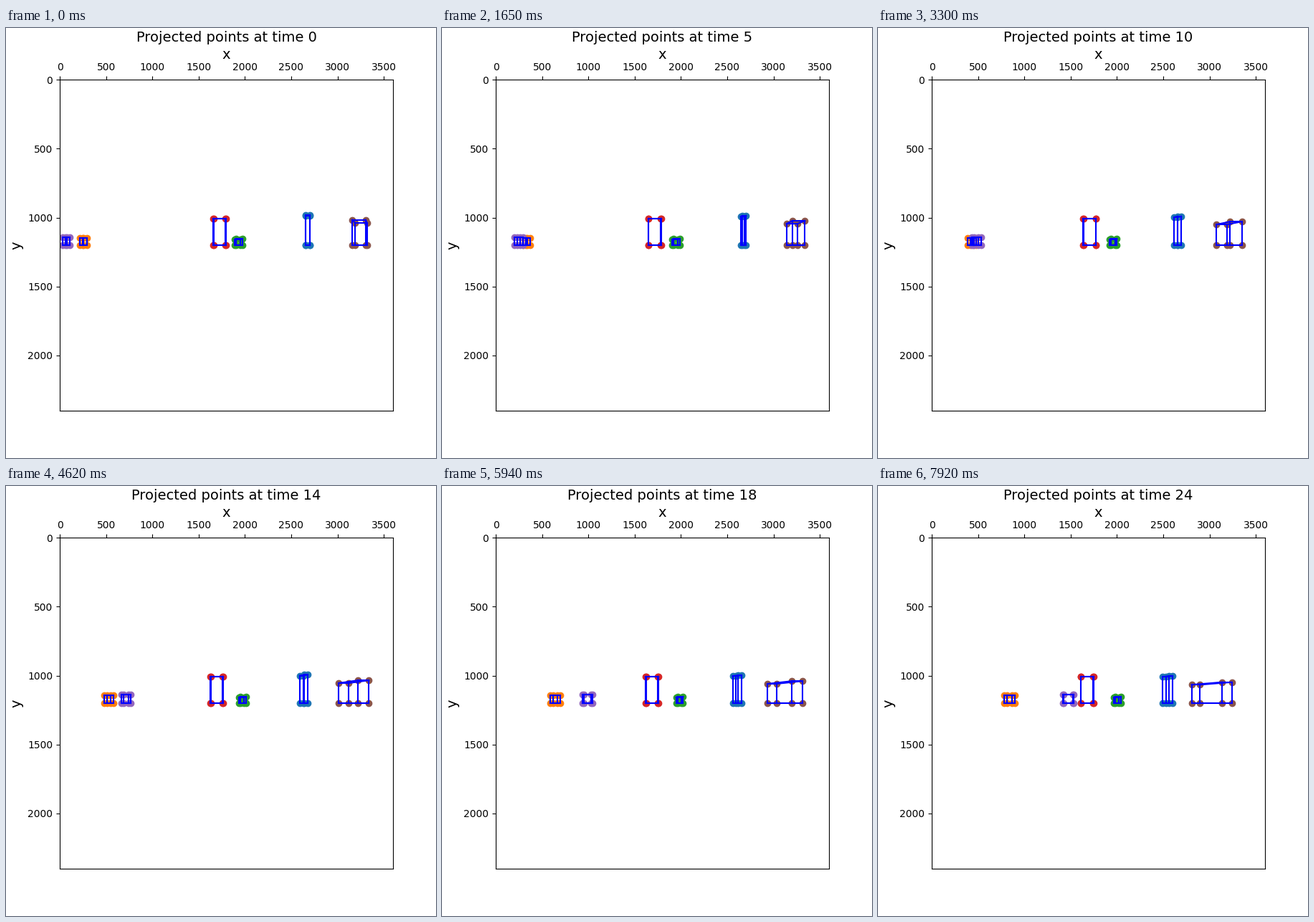
A matplotlib script for the animation above (8 s loop, 600 px wide and 600 px high).

```python
import numpy as np
import matplotlib.pyplot as plt
from matplotlib.animation import FuncAnimation

LOOP, TICK, STEP = 8000, 40, 330      # ms
GROUND = 1200                         # y of every footprint

# footprint corners in ring order: side (left/right) and row (near/far)
SIDE = np.array([-1, 1, 1, -1])
ROW = np.array([1, 1, -1, -1])

fig = plt.figure(figsize=(6, 6), dpi=100)
ax = fig.add_axes([0.125, 0.11, 0.775, 0.77])
ax.set_xlim(0, 3600)
ax.set_ylim(2400, 0)
ax.xaxis.tick_top()
ax.xaxis.set_label_position("top")
ax.set_xlabel("x", fontsize=14)
ax.set_ylabel("y", fontsize=14)
title = ax.set_title("Projected points at time 0", fontsize=14)


def at(t, start, speed=0, accel=0):
    return start + speed * t + accel * t * t


def to_x(px):
    return (px - 75) * 3600 / 465


class Box:
    """Projected cuboid. Each argument is (start, speed, accel) in stage pixels.

    width is half an edge, skew is how far the near edge slides against the far
    one as the box turns, taper enlarges the near edge and shrinks the far one.
    """

    def __init__(self, color, center, width, skew, height, taper=0):
        self.motion = center, width, skew, height
        self.scale = 1 + taper * ROW
        self.dots = ax.scatter(np.zeros(8), np.zeros(8), color=color)
        self.edges = [ax.plot([], [], color="blue")[0] for _ in range(12)]

    def move(self, t):
        center, width, skew, height = (at(t, *m) for m in self.motion)
        x = to_x(center + SIDE * width * self.scale + ROW * skew)
        base = np.full(4, GROUND)
        top = base - height * self.scale * 2400 / 462
        self.dots.set_offsets(np.column_stack([np.tile(x, 2), np.append(base, top)]))
        for i in range(4):
            j = (i + 1) % 4
            self.edges[i].set_data([x[i], x[j]], [base[i], base[j]])
            self.edges[4 + i].set_data([x[i], x[j]], [top[i], top[j]])
            self.edges[8 + i].set_data([x[i], x[i]], [base[i], top[i]])


boxes = [
    Box("C0", center=(421.2, 0, -0.03), width=(2.75, -0.025),
        skew=(0, 0.26, -0.003), height=(41.2, -0.16), taper=0.016),
    Box("C1", center=(107.9, 1.72, 0.0594), width=(2.05,),
        skew=(2.6, 0.12), height=(9.8, 0.06)),
    Box("C2", center=(324.3, 0.39), width=(4.15, -0.02),
        skew=(1, 0.01), height=(8.5,), taper=0.05),
    Box("C3", center=(298, -0.265), width=(8.65,),
        skew=(0.45,), height=(37,)),
    Box("C4", center=(84.1, 3.72, 0.16), width=(2.3, -0.062),
        skew=(3, 0.165), height=(11, 0.05)),
    Box("C5", center=(493.9, 0.09, -0.0535), width=(8.8, -0.108),
        skew=(-1.5, 1.27, -0.0125), height=(33.2, -0.238), taper=0.065),
]


def update(i):
    t = (i * TICK + TICK - 1) // STEP
    title.set_text(f"Projected points at time {t}")
    for box in boxes:
        box.move(t)


anim = FuncAnimation(fig, update, frames=LOOP // TICK, interval=TICK,
                     init_func=lambda: update(0), repeat=True, repeat_delay=0)
plt.show()
```
